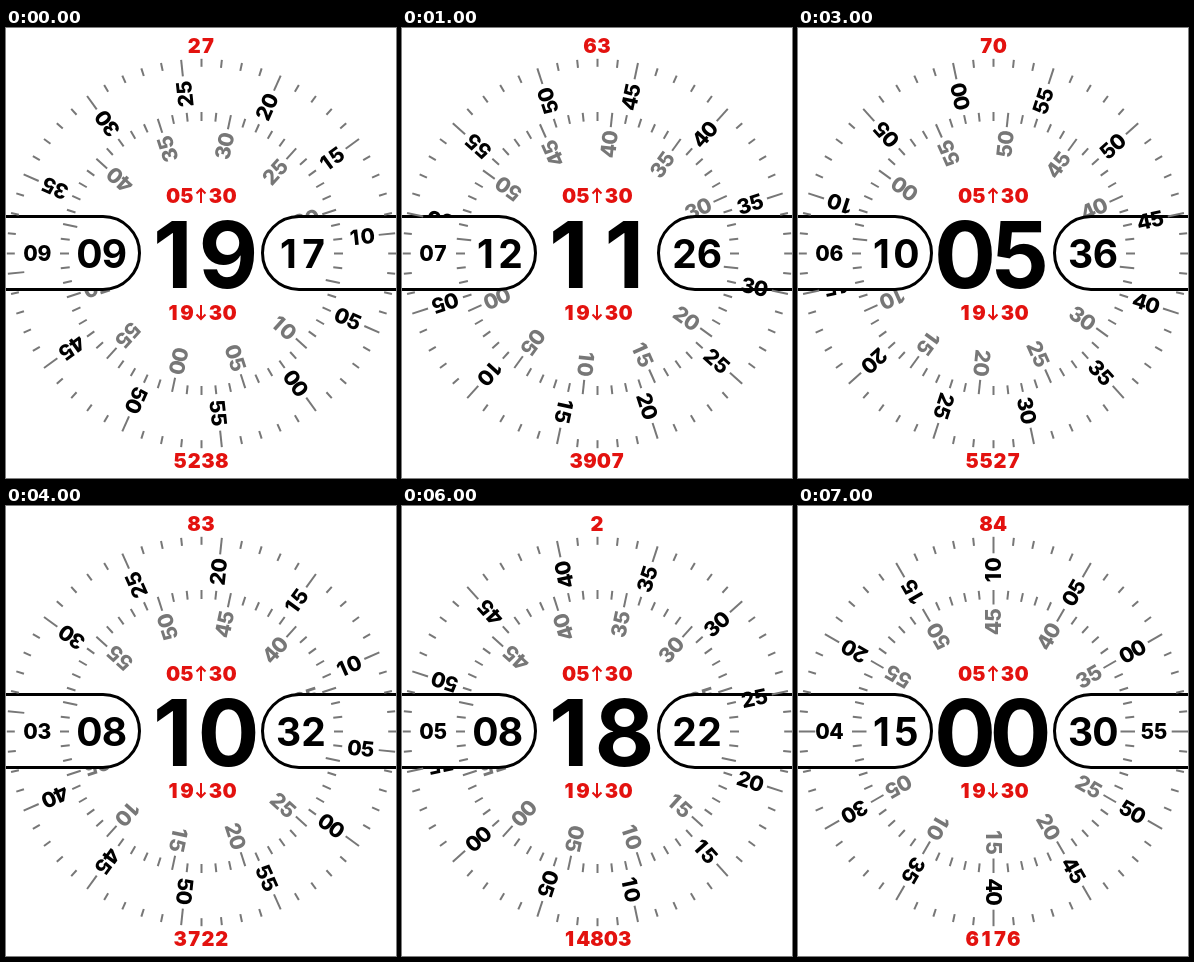
An HTML page for the animation above (8000 ms loop, 390 px wide and 450 px high).

```html
<!DOCTYPE html>
<html lang="en">
<head>
<meta charset="utf-8">
<title>Dial watch face</title>
<style>
  html, body { margin: 0; width: 100%; height: 100%; overflow: hidden; background: #fff; }
  svg { display: block; }
  text { font: 700 20px Inter, "Open Sans", sans-serif; text-anchor: middle; }
  .red { fill: #e3120f; font-weight: 900; }
  .arrow { fill: none; stroke: #e3120f; stroke-width: 2; }
  .pill { fill: #fff; stroke: #000; stroke-width: 3; }
  .tick { stroke: #777; stroke-width: 2; }
  .label { font-size: 21px; font-weight: 800; }
  #innerLabels { fill: #777; }
</style>
</head>
<body>
<svg width="390" height="450" viewBox="0 0 390 450">
  <g transform="translate(195.5 225.5)"><g id="innerLabels"></g></g>
  <rect class="pill" x="256.5" y="188.5" width="200" height="73" rx="36.5"/>
  <g transform="translate(195.5 225.5)"><g id="outerLabels"></g></g>
  <rect class="pill" x="-66.5" y="188.5" width="200" height="73" rx="36.5"/>
  <g transform="translate(195.5 225.5)"><g id="innerTicks"></g><g id="outerTicks"></g></g>
  <g id="readouts"></g>
  <path class="arrow" d="M195 175V161M190.5 165.5L195 161L199.5 165.5M195 277V291M190.5 286.5L195 291L199.5 286.5"/>
</svg>
<script>
const $ = id => document.getElementById(id);
const pad = n => String(n).padStart(2, "0");

function add(parent, tag, attrs) {
  const el = document.createElementNS("http://www.w3.org/2000/svg", tag);
  for (const name in attrs) el.setAttribute(name, attrs[name]);
  return parent.appendChild(el);
}

// Digits sit on an even grid centred on x.
function setDigits(el, value, x, pitch) {
  const text = String(value);
  el.textContent = text;
  el.setAttribute("x", [...text].map((_, i) => x + (i - (text.length - 1) / 2) * pitch).join(" "));
}

function readout(x, y, size, pitch, className = "") {
  const el = add($("readouts"), "text", { y, class: className, style: `font-size:${size}px` });
  return value => setDigits(el, value, x, pitch);
}

// Values run anticlockwise from three o'clock, six degrees apart.
function makeRing(name, labelRadius, outerEdge, minorLength, majorLength) {
  const labels = $(name + "Labels"), ticks = $(name + "Ticks");
  for (let value = 0; value < 60; value++) {
    const major = value % 5 === 0, turn = `rotate(${-value * 6})`;
    add(ticks, "line", {
      x1: outerEdge - (major ? majorLength : minorLength), x2: outerEdge,
      transform: turn, class: "tick"
    });
    if (major) {
      const label = add(labels, "text", { y: 7.6, transform: turn, class: "label" });
      setDigits(label, pad(value), labelRadius, 13.2);
    }
  }
  return value => [labels, ticks].forEach(g => g.setAttribute("transform", `rotate(${value * 6})`));
}

const turnMinutes = makeRing("inner", 110, 141.5, 9, 14.5);
const turnSeconds = makeRing("outer", 160.5, 194.7, 8, 16.5);

const showBattery = readout(195, 25, 20, 13.8, "red");
const showSteps = readout(195, 439.5, 20, 13.8, "red");
const showMonth = readout(31.5, 232.8, 21, 13.8, "label");
const showDay = readout(96, 239.5, 39, 25);
const showHour = readout(194.7, 259.5, 92, 55.5);
const showMinute = readout(295, 239.5, 39, 25);

for (const [value, x, y] of [["05", 174, 174.5], ["30", 216.5, 174.5], ["19", 174, 291.5], ["30", 216.5, 291.5]])
  readout(x, y, 20, 14, "red")(value);

// battery, steps, month, day, hour, minute, second
const states = [
  [27, 5238, 9, 9, 19, 17, 9],
  [63, 3907, 7, 12, 11, 26, 32],
  [87, 8794, 4, 21, 21, 34, 46],
  [70, 5527, 6, 10, 5, 36, 43],
  [83, 3722, 3, 8, 10, 32, 6],
  [41, 9460, 2, 18, 16, 47, 39],
  [2, 14803, 5, 8, 18, 22, 23],
  [84, 6176, 4, 15, 0, 30, 55]
];
let shown = -1;

function draw() {
  const index = Math.floor(performance.now() / 1000) % states.length;
  if (index !== shown) {
    shown = index;
    const [battery, steps, month, day, hour, minute, second] = states[index];
    showBattery(battery);
    showSteps(steps);
    showMonth(pad(month));
    showDay(pad(day));
    showHour(pad(hour));
    showMinute(pad(minute));
    turnMinutes(minute);
    turnSeconds(second);
  }
  requestAnimationFrame(draw);
}
draw();
</script>
</body>
</html>
```
